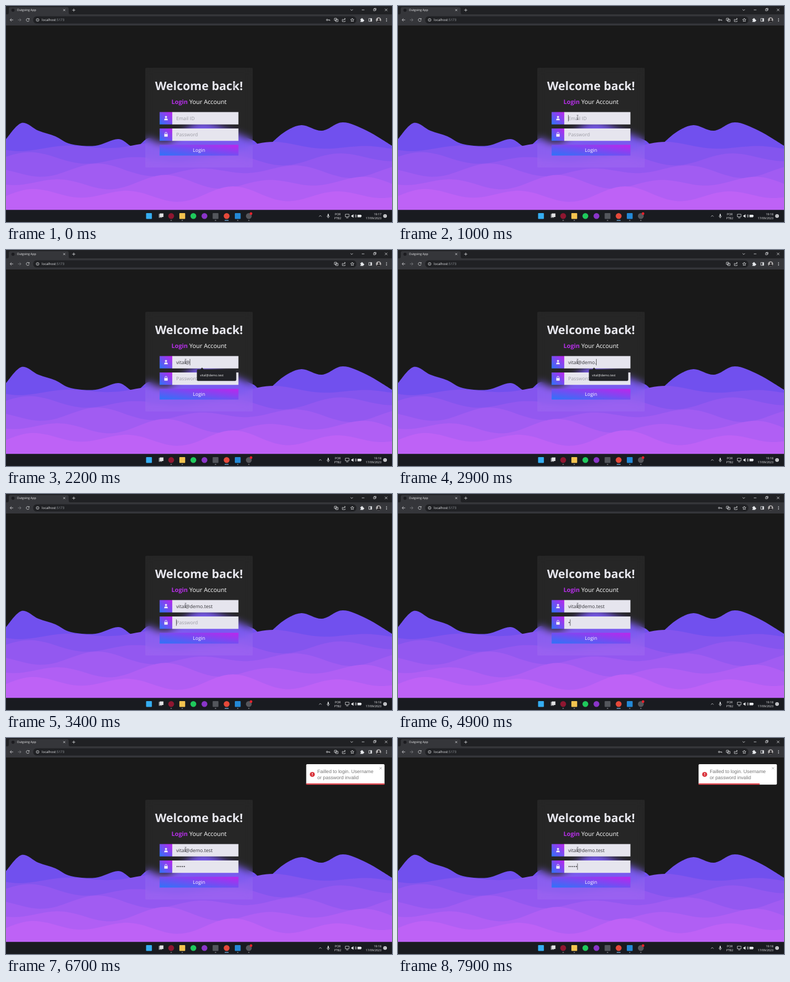
Animation, 690 px wide and 388 px high, one loop 8 s. Source, as an HTML page:

```html
<!DOCTYPE html>
<html lang="en">
<head>
<meta charset="utf-8">
<title>Login</title>
<style>
  html, body { margin: 0; width: 100%; height: 100%; overflow: hidden; background: #191919; }
  svg, #card { position: absolute; left: 0; top: 0; }
  svg { width: 690px; height: 388px; }
  #card {
    left: 248.6px; top: 110.7px; width: 192.8px; height: 179.6px; border-radius: 1.5px;
    background: rgba(255, 255, 255, .06); backdrop-filter: blur(7px);
  }
  text { font-family: "Open Sans", sans-serif; text-rendering: geometricPrecision; white-space: pre; }
  .line { fill: none; stroke: #dcdde0; stroke-width: .8; }
  .dim { stroke: #85868a; }
  .lit { fill: #e8eaed; }
  .field { font-size: 8.65px; fill: #333338; }
  .hint { fill: #9b9ba3; }
  .small { font-size: 5.3px; fill: #f0f0f2; }
  #toast text { font: 8.65px "Liberation Sans", sans-serif; fill: #757575; }
  #beam { mix-blend-mode: difference; }
</style>
</head>
<body>
<svg id="back" viewBox="0 0 690 388"></svg>
<div id="card"></div>
<svg viewBox="0 0 690 388">
  <defs>
    <linearGradient id="glow" x1="0" y1="1" x2="1" y2="0">
      <stop offset="0" stop-color="#2d74f8"/><stop offset="1" stop-color="#bd25ec"/>
    </linearGradient>
    <clipPath id="face"><circle cx="666" cy="25" r="4.6"/></clipPath>
  </defs>

  <!-- browser -->
  <path fill="#202124" d="M0 0H690V16H0Z"/>
  <path fill="#35363a" d="M0 15H2Q5 15 5 12V5Q5 2 8 2H109Q112 2 112 5V12Q112 15 115 15H690V35H0Z"/>
  <circle cx="12.5" cy="7.5" r="2.8" fill="#1c1c20"/>
  <text class="small" x="19.6" y="9.4">Outgoing App</text>
  <path class="line" d="M102.4 5.7l3.4 3.4m0-3.4l-3.4 3.4M118.4 7.4h5.4m-2.7-2.7v5.4"/>
  <path class="line" d="M615.8 6l2.2 2.2 2.2-2.2M636 7h4.6M657 5.4h3.2v3.2h-3.2zM658.2 5.2v-1h3.2v3.2h-1M677.3 4.8l4.4 4.4m0-4.4l-4.4 4.4"/>
  <rect x="48.5" y="18.4" width="578" height="13.2" rx="6.6" fill="#202124"/>
  <path class="line" d="M12.8 25H7.4m2.5-2.5L7.3 25l2.6 2.5M41.1 23.4a2.7 2.7 0 1 0 .4 2.4M41.5 22.2v1.8h-1.8"/>
  <path class="line dim" d="M21.4 25h5.4m-2.5-2.5l2.6 2.5-2.6 2.5"/>
  <path class="line" d="M59 25a2.5 2.5 0 1 1-5 0a2.5 2.5 0 1 1 5 0M56.5 24.7v1.5m0-2.8v.5"/>
  <text x="64" y="27.2" font-size="6" fill="#e8eaed">localhost<tspan fill="#9aa0a6">:5173</tspan></text>
  <g id="key" class="line"><circle cx="574" cy="25" r="1.3"/><path d="M575.4 25h3.6v1.5m-1.5-1.5v1.2"/></g>
  <path class="line" d="M587 22h4v4h-4zM589.5 24h4v4h-4zM602.5 24h-1.3v4h5v-1.6M603 26q.2-2.8 3.5-2.8m-1.5-1.5l1.7 1.5-1.7 1.6"/>
  <path class="line" d="M619 22l.9 2 2.2.2-1.7 1.5.5 2.2-1.9-1.1-1.9 1.1.5-2.2-1.7-1.5 2.2-.2z"/>
  <path class="lit" d="M633.5 23.2h1.8a1.1 1.1 0 1 1 2.1 0h1.3v1.8a1.1 1.1 0 1 1 0 2v1.4h-5.2v-1.4a1 1 0 0 0 0-2z"/>
  <path class="line" d="M648.6 22.4h5.2v5.2h-5.2z"/><path class="lit" d="M651.5 22.4h2.3v5.2h-2.3z"/>
  <g clip-path="url(#face)">
    <path fill="#b5b2b2" d="M661 20h10v10h-10z"/>
    <circle cx="666.4" cy="23.8" r="1.8" fill="#29282b"/><circle cx="666.4" cy="29.2" r="3.6" fill="#29282b"/>
  </g>
  <path class="lit" d="M679.6 22h1.3v1.3h-1.3zM679.6 24.4h1.3v1.3h-1.3zM679.6 26.8h1.3v1.3h-1.3z"/>

  <!-- form -->
  <text x="345" y="151" text-anchor="middle" font-size="21.05" font-weight="700" fill="#e8e8ef">Welcome back!</text>
  <text x="345" y="176" text-anchor="middle" font-size="10.8" fill="#fff"><tspan font-weight="700" fill="#b62fe8">Login</tspan> Your Account</text>
  <path fill="#e6e5ee" d="M297 190.5H415.5V212.7H297zM297 220H415.5V242.2H297z"/>
  <g fill="url(#glow)">
    <rect x="274.6" y="190.5" width="22.6" height="22.2"/>
    <rect x="274.6" y="220" width="22.6" height="22.2"/>
    <rect x="274.6" y="249.4" width="140.9" height="19.2"/>
  </g>
  <g fill="#eeeaf8">
    <circle cx="286" cy="199.3" r="1.9"/><path d="M282.7 205.2q0-3.4 3.3-3.4t3.3 3.4z"/>
    <rect x="282.9" y="230" width="6.2" height="4.7" rx=".6"/>
    <path d="M284.2 230v-1.3a1.8 1.8 0 0 1 3.6 0V230" fill="none" stroke="#eeeaf8"/>
  </g>
  <text x="345" y="262.2" text-anchor="middle" font-size="8.65" fill="#fff">Login</text>
  <text id="mail" class="field" x="304.3" y="204.8"></text>
  <text id="pass" class="field" x="304.3" y="234.2"></text>
  <path id="caret" d="M0 0V11.4" stroke="#222" stroke-width=".7"/>
  <g id="popup">
    <path fill="#212226" stroke="#36373b" stroke-width=".5" d="M343 214.4H347.4L350.4 211.5 353.4 214.4H409.5Q411.4 214.4 411.4 216.4V233Q411.4 235 409.5 235H343.3Q341.4 235 341.4 233V216.4Q341.4 214.4 343 214.4Z"/>
    <text x="346.8" y="226.8" font-size="5.6" fill="#eee">vital@demo.test</text>
  </g>

  <!-- taskbar -->
  <path fill="#191b20" d="M0 366.3H690V388H0Z"/>
  <g id="apps"></g>
  <path fill="#8d8f94" d="M273 373.4h6v7h-6z"/><path fill="#e2e3e5" d="M275 372.6h6.4v6.4H275z"/>
  <circle cx="438" cy="373" r="2.4" fill="#e5222d"/>
  <path class="line" d="M559.6 378.4l2.2-2.2 2.2 2.2M574 376.6v1a2 2 0 0 0 4 0v-1M576 379.6v1.6M606.6 374h6.6v4.6h-6.6zM608 380.6h4M624 375.2q1.6 2 0 4M625.4 374.4q2.2 2.8 0 5.6"/>
  <path class="lit" d="M575.1 373.5h1.8v4.6h-1.8zM617.4 376h1.4l2.4-2v6.4l-2.4-2h-1.4zM628.4 375h6.4v4.4h-6.4zM634.8 376.3h.9v1.8h-.9z"/>
  <g class="small">
    <text x="593" y="375.6" text-anchor="middle">POR</text>
    <text x="593" y="383" text-anchor="middle">PTB2</text>
    <text id="clock" x="671" y="375.6" text-anchor="end"></text>
    <text x="671" y="383" text-anchor="end">17/09/2023</text>
  </g>
  <circle cx="677.6" cy="377.2" r="3.2" fill="#d5d6d9"/>
  <text x="677.6" y="379.1" text-anchor="middle" font-size="5" fill="#222">1</text>

  <!-- toast -->
  <g id="toast">
    <rect x="537.3" y="47" width="140" height="36.8" rx="1.8" fill="#fff"/>
    <circle cx="548.2" cy="65.4" r="4.5" fill="#d9343c"/>
    <path d="M548.2 62.8v3.2m0 1v1.1" stroke="#fff" stroke-width="1.1"/>
    <text x="557.2" y="62.8">Failled to login. Username</text>
    <text x="557.2" y="74.4">or password invalid</text>
    <path d="M668.4 52.4l4 4m0-4l-4 4" stroke="#999" stroke-width=".8"/>
    <rect id="bar" x="537.3" y="81.6" width="140" height="2.2" fill="#d9343c"/>
  </g>
  <path id="beam" d="M-1.5 -3.8H1.5M0 -3.8V3.8M-1.5 3.8H1.5" fill="none" stroke="#a8a8a8" stroke-width=".6"/>
</svg>
<script>
const LOOP = 8000, MAIL = "vital@demo.test", BLINK = 530;
const CLICK = 1000, TAB = 3400, TOAST = 6250, COUNTDOWN = 6800;
const $ = id => document.getElementById(id);
const clamp = v => Math.max(0, Math.min(1, v));
const show = (id, on) => $(id).setAttribute("visibility", on ? "visible" : "hidden");
const move = (id, x, y) => $(id).setAttribute("transform", `translate(${x} ${y})`);

// Smooth crest through points, filled down to the taskbar.
function crest(pts, fill) {
  let d = `M${pts[0]}`;
  for (let i = 0; i < pts.length - 1; i++) {
    const p = pts[i], q = pts[i + 1], a = pts[i - 1] || p, b = pts[i + 2] || q;
    d += `C${p[0] + (q[0] - a[0]) / 6} ${p[1] + (q[1] - a[1]) / 6} ` +
         `${q[0] - (b[0] - p[0]) / 6} ${q[1] - (b[1] - p[1]) / 6} ${q}`;
  }
  return `<path fill="${fill}" d="${d}V370H0Z"/>`;
}

// Lower swells: two sines each, sinking and turning pink layer by layer.
function swell(i) {
  const pts = [];
  for (let x = 0; x <= 690; x += 15) {
    const y = 253 + 21.5 * i + (6 + i) * Math.sin(x / 29 + 2.1 * i + 1.2) + 5 * Math.sin(x / 47 + 3.7 * i);
    pts.push([x, y]);
  }
  return crest(pts, `rgb(${132 + 14.5 * i} ${85 + 3.3 * i} ${238 + 2 * i})`);
}

const ridge = [[0, 239], [28, 210], [58, 224], [88, 234], [116, 248], [160, 251], [201, 239], [230, 254],
  [256, 237], [284, 249], [345, 209], [400, 225], [441, 241], [462, 254], [497, 227], [528, 214], [565, 224],
  [602, 209], [645, 224], [690, 251]];
$("back").innerHTML = crest(ridge, "#7150ee") + [0, 1, 2, 3, 4].map(swell).join("");

// Taskbar apps stand at an even pitch; a bar below marks the open ones.
const apps = [
  { fill: "#35aef2", square: 1 }, {}, { fill: "#8f1731", open: 1 }, { fill: "#f3c34f", square: 1, open: 1 },
  { fill: "#1fc95c" }, { fill: "#8a35c8" }, { fill: "#53565c", square: 1, open: 1 },
  { fill: "#e5493a", open: 3 }, { fill: "#2489d6", square: 1, open: 1 }, { fill: "#55565b", open: 1 }];
$("apps").innerHTML = apps.map(({ fill = "none", square, open = 0 }, i) => {
  const x = 255.6 + 19.83 * i, w = 2.4 * open;
  return `<rect x="${x - 5.2}" y="372.1" width="10.4" height="10.4" rx="${square ? 1 : 5.2}" fill="${fill}"/>` +
    `<rect x="${x - w / 2}" y="384.6" width="${w}" height="1.2" rx=".6" fill="${open > 1 ? "#78b8ea" : "#96989d"}"/>`;
}).join("");

// Evenly spaced key presses; step -1 deletes.
const run = (from, every, n, step = 1) => ({ from, every, n, step });
const mailRuns = [run(1400, 140, MAIL.length)];
const passRuns = [run(3800, 200, 2), run(4500, 100, 2, -1), run(4900, 200, 5)];

function typed(runs, t) {
  let count = 0, last = 0;
  for (const { from, every, n, step } of runs) {
    if (t < from) break;
    const done = Math.min(n, Math.floor((t - from) / every) + 1);
    count += done * step;
    last = from + (done - 1) * every;
  }
  return { count, last };
}

// cubic-bezier(.215, .61, .355, 1)
function ease(x) {
  let lo = 0, hi = 1;
  const b = (s, p, q) => 3 * s * (1 - s) ** 2 * p + 3 * s * s * (1 - s) * q + s ** 3;
  for (let i = 0; i < 20; i++) {
    const m = (lo + hi) / 2;
    b(m, .215, .355) < x ? lo = m : hi = m;
  }
  return b(lo, .61, 1);
}

const bounce = [[0, 1320], [.6, -11], [.75, 4.4], [.9, -2.2], [1, 0]];
function slide(p) {
  if (p >= 1) return 0;
  const i = bounce.findIndex(k => k[0] > p), [p0, x0] = bounce[i - 1], [p1, x1] = bounce[i];
  return x0 + (x1 - x0) * ease((p - p0) / (p1 - p0));
}

// Fills a field and returns the width of its typed text.
function label(id, text, hint) {
  const el = $(id), s = text || hint;
  if (el.textContent !== s) el.textContent = s;
  el.classList.toggle("hint", !text);
  return text ? el.getComputedTextLength() : 0;
}

function draw(t) {
  const mail = typed(mailRuns, t), pass = typed(passRuns, t), inPass = t >= TAB;
  const mailW = label("mail", MAIL.slice(0, mail.count), "Email ID");
  const passW = label("pass", "•".repeat(pass.count), "Password");

  const since = inPass ? Math.max(TAB, pass.last) : Math.max(CLICK, mail.last);
  show("caret", t >= CLICK && Math.floor((t - since) / BLINK) % 2 === 0);
  move("caret", 304.6 + (inPass ? passW : mailW), inPass ? 225.3 : 195.8);

  show("popup", mail.count > 0 && !inPass);
  show("key", mail.count === 0 || pass.count > 0);
  $("clock").textContent = t < 500 ? "19:17" : "19:18";

  const m = clamp((t - 100) / 700), s = m * m * (3 - 2 * m);
  move("beam", 408 - 87 * s, 143 + 57 * s);

  show("toast", t >= TOAST);
  move("toast", slide(Math.max(0, t - TOAST) / 700), 0);
  $("bar").setAttribute("width", 140 * (1 - clamp((t - COUNTDOWN) / 5000)));
}

const start = performance.now();
function tick() {
  draw((performance.now() - start) % LOOP);
  requestAnimationFrame(tick);
}
tick();
</script>
</body>
</html>
```
